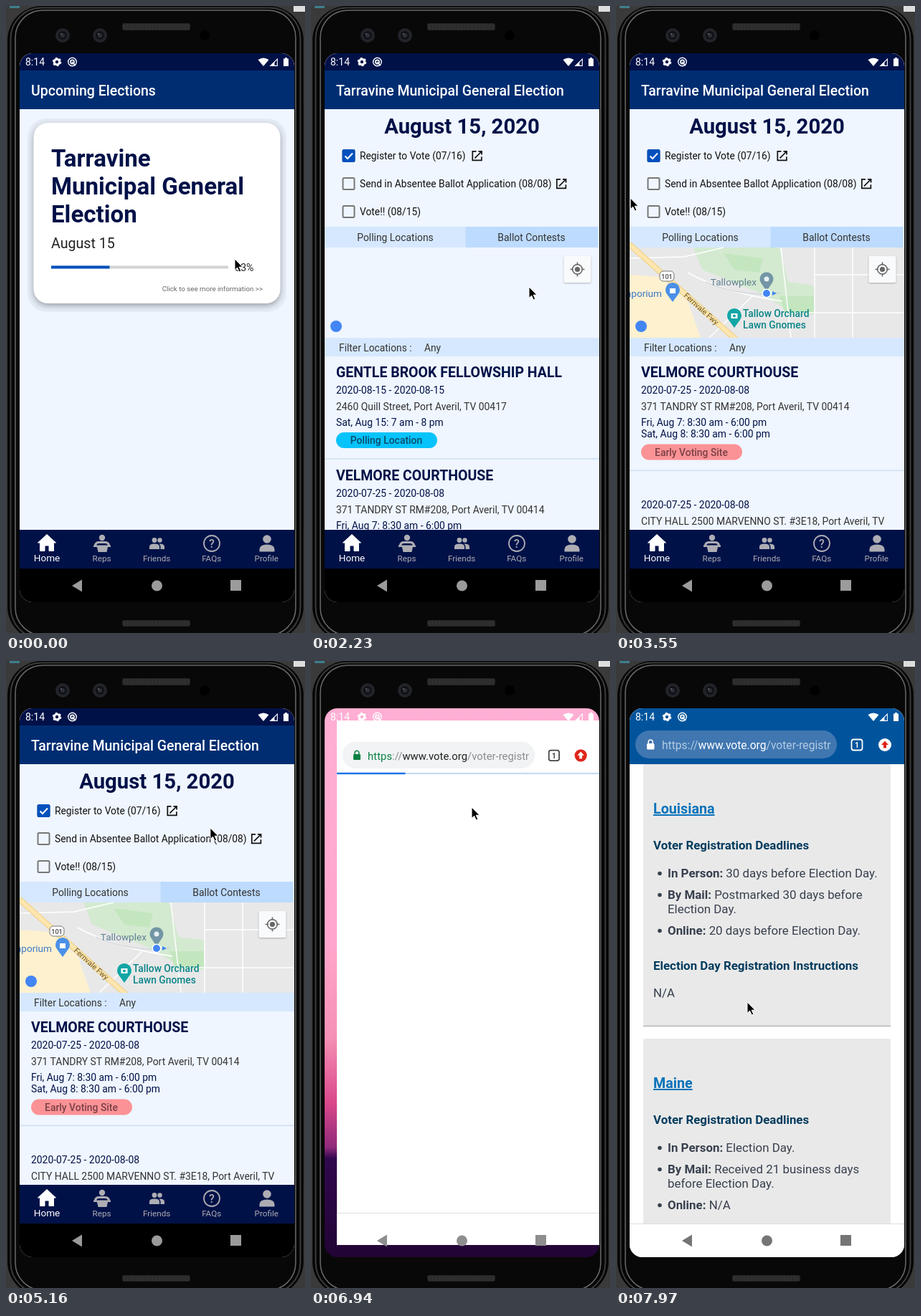
Animation of 417x875 px, one loop 8000 ms. Source, as an HTML page:

```html
<!DOCTYPE html>
<html lang="en">
<head>
<meta charset="utf-8">
<title>Election app walkthrough</title>
<style>
  html, body { margin: 0; width: 100%; height: 100%; overflow: hidden; background: #333; }
  svg { display: block; width: 100vw; height: 100vh; font-family: Roboto, sans-serif; }
  text { white-space: pre; }
  .shadow { filter: drop-shadow(0 3px 4px #0005); }
</style>
</head>
<body>
<svg id="stage" viewBox="0 0 417 875"></svg>
<script>
const NAVY = '#001148', BLUE = '#0050bd';
const svg = document.getElementById('stage');

const text = (x, y, size, str, fill = '#222', more = '') =>
  `<text x="${x}" y="${y}" font-size="${size}" fill="${fill}" ${more}>${str}</text>`;
const rect = (x, y, w, h, fill, more = '') =>
  `<rect x="${x}" y="${y}" width="${w}" height="${h}" fill="${fill}" ${more}/>`;
const circle = (x, y, r, fill, more = '') =>
  `<circle cx="${x}" cy="${y}" r="${r}" fill="${fill}" ${more}/>`;
const path = (d, fill, more = '') => `<path d="${d}" fill="${fill}" ${more}/>`;
const line = (d, stroke, width = 1, more = '') =>
  path(d, 'none', `stroke="${stroke}" stroke-width="${width}" ${more}`);
const group = (id, body, more = '') => `<g id="${id}" ${more}>${body}</g>`;
const MID = 'text-anchor="middle"', END = 'text-anchor="end"';
const BOLD = 'font-weight="700"', MEDIUM = 'font-weight="500"';

function phone() {
  const speaker = (y, h) => rect(162, y, 95, h, '#252525', 'rx="3"') +
    line(`M164 ${y + h / 2}H255`, '#3a3a3a', h - 2, 'stroke-dasharray="1 1.5"');
  const lens = x => circle(x, 41, 10, '#22242a') + circle(x, 41, 6, '#101216') +
    circle(x, 41, 3, '#2b3038') + circle(x - 2, 39, 1, '#667');
  return rect(0, 0, 417, 875, '#3a3a3a') + rect(5, 0, 14, 3, '#3f7f8c') + rect(401, 0, 16, 8, '#ddd') +
    rect(2, 0, 413, 886, '#050505', 'rx="48"') +
    rect(6.5, 2.5, 404, 880, '#050505', 'rx="43" stroke="#3c3c3c" stroke-width="2"') +
    rect(13, 6, 391, 872, '#080808', 'rx="38" stroke="#6a6a6a" stroke-width="1.5"') +
    speaker(24, 10) + speaker(857, 9) + lens(79) + lens(131) + circle(277, 41, 7, '#000');
}

function statusIcons() {
  const w = '#fff';
  return text(27, 83, 14, '8:14', w) +
    circle(71, 78, 3.7, 'none', `stroke="${w}" stroke-width="3"`) +
    circle(71, 78, 5.4, 'none', `stroke="${w}" stroke-width="1.8" stroke-dasharray="2.8 2.85"`) +
    circle(92.5, 78, 5.8, 'none', `stroke="${w}" stroke-width="1.4"`) +
    circle(92.5, 78, 2.6, 'none', `stroke="${w}" stroke-width="1.6"`) +
    line('M92 78L97 83', w, 1.6) +
    path('M351.5 75Q359 70 366.5 75L359 84z', w) +
    line('M368.8 83.4H378.4V74z', w, 1.1) + path('M368 84L374.5 77.5V84z', w) +
    path('M387 73.5h2v-1.5h3v1.5h2V84h-7z', w);
}

const navIcons = () => path('M106 800.5V817.5L92 809z', '') + circle(210.5, 809, 7.5, '') + rect(313, 801, 15, 15, '');

function tabBar() {
  const grey = '#adadb3';
  const icons = path('M57 737.5L69.5 749H66.5V760.5H60V753H54V760.5H47.5V749H44.5z', '#fff', 'stroke="#fff" stroke-linejoin="round"') +
    circle(134, 742, 4.2, grey) +
    line('M124.5 753Q125 748.5 130 748.5H138Q143 748.5 143.5 753', grey, 3.2) +
    path('M122 752.5H146V755H142L140.5 762H128.5L127 755H122z', grey) +
    circle(207, 745.5, 3.4, grey) + path('M200 758V754.5Q200 750.5 207 750.5T214 754.5V758z', grey) +
    circle(214.5, 745.5, 3.2, grey) + path('M215.5 758V754.5Q215.5 752 213.5 750.6Q221 750.5 221 754.5V758z', grey) +
    circle(287, 750, 11, 'none', `stroke="${grey}" stroke-width="1.8"`) +
    text(287, 756, 16, '?', grey, MID + MEDIUM) +
    circle(364, 744, 5.8, grey) + path('M353.5 761.5V758Q354 751.5 364 751.5T374.5 758V761.5z', grey);
  const labels = ['Reps', 'Friends', 'FAQs', 'Profile']
    .map((s, i) => text(133.5 + i * 76.6, 775, 11.7, s, grey, MID)).join('');
  return rect(19, 731, 383, 54, NAVY) + icons + text(57, 775, 13.6, 'Home', '#fff', MID) + labels;
}

const header = title => rect(19, 90, 383, 54, '#002d72') + text(35, 125, 19.5, title, '#fff', MEDIUM);

function home() {
  const title = ['Tarravine', 'Municipal General', 'Election']
    .map((s, i) => text(63, 224 + i * 39, 33.1, s, NAVY, BOLD)).join('');
  return header('Upcoming Elections') + group('card',
    rect(30, 157, 361, 270, '#e6edf7', 'rx="26"') +
    rect(38.5, 163, 344, 252, '#fff', 'rx="20" class="shadow"') + title +
    text(63, 338, 19.6, 'August 15') +
    rect(63, 362.5, 247, 4, '#d3d3d3') + rect(63, 362.5, 81.5, 4, BLUE) +
    text(345.5, 370, 14.2, '33%', '#222', END) +
    text(358, 398, 9.75, 'Click to see more information &gt;&gt;', '#666', END));
}

function task(y, label, linkX) {
  const link = linkX ? line(`M${linkX - 1} ${y - 6.2}h-5.2v12.6h12.6v-5.2M${linkX + 2} ${y - 6.2}h4.6v4.6M${linkX + 6.4} ${y - 6}l-9.4 9.4`, '#111', 1.7) : '';
  return rect(44.5, y - 8, 16, 16, 'none', 'rx="1.5" stroke="#777" stroke-width="2"') +
    text(68, y + 5, 13.8, label, '#111') + link;
}

// One location entry; the tag follows the last opening time.
function place(y, [name, dates, address, hours, tag, tagFill, tagInk]) {
  const tagY = y + 77 + (hours.length - 1) * 16.5;
  return text(35, y, 19.5, name, NAVY, BOLD) + text(35, y + 23, 13.9, dates, NAVY) +
    text(35, y + 46, 13.9, address, '#333') +
    hours.map((h, i) => text(35, y + 68 + i * 16, 13.9, h, NAVY)).join('') +
    rect(35, tagY, 141, 22, tagFill, 'rx="11"') + text(105, tagY + 16, 13.9, tag, tagInk, MID + MEDIUM) +
    rect(19, tagY + 36, 383, 1.6, '#cfe0f3');
}

function map() {
  const road = (d, w = 2) => line(d, '#fff', w);
  return rect(19, 337, 383, 126, '#e8e8e8') +
    path('M108 337H228L240 385 276 390V420H232L200 400 120 368z', '#d3ead0') +
    path('M150 345L205 352 200 372 165 368zM228 405H276V430H236z', '#c3e6bf') +
    path('M19 375L62 378 100 412 118 463H19z', '#fdf1cf') +
    road('M19 352L95 350 150 337M100 372Q150 400 232 412M277 337V463M230 337L244 463M330 337V463M277 375H402M232 428H402M130 463L190 405', 1.5) +
    line('M125 385Q180 408 230 400', '#c9d1d8', 1.2) +
    line('M18 332L168 466', '#f0cd80', 8) + line('M18 332L168 466', '#fce6ae', 6) +
    rect(61, 370, 20, 14, '#fff', 'rx="5" stroke="#777"') + text(71, 380.5, 9, '101', '#444', MID + MEDIUM) +
    text(64, 406, 13.6, 'nd mporium', '#3c78c8', END) +
    path('M79 413L71 402A10 10 0 1 1 87 402z', '#4a90e8') + rect(75, 394, 8, 7, '#fff') +
    text(0, 0, 10.5, 'Fernvale Fwy', '#6b5320', 'transform="translate(94 405) rotate(42)"') +
    text(196, 390, 13.6, 'Tallowplex', '#5f7f90', END) +
    path('M210 398L202 386A9.5 9.5 0 1 1 218 386z', '#7395a5') + circle(210, 381, 3.5, '#e7f0f3') +
    circle(210, 401, 6.5, '#fff') + circle(210, 401, 5, '#4285f4') + path('M218 398L224 401 218 404z', '#4285f4') +
    path('M165 449L157 438A10 10 0 1 1 173 438z', '#12a5a5') + rect(160.5, 429, 9, 7, '#fff') + circle(165, 432.5, 2, '#12a5a5') +
    text(177, 434, 13.8, 'Tallow Orchard', '#0b8588', MEDIUM) + text(177, 449.5, 13.8, 'Lawn Gnomes', '#0b8588', MEDIUM);
}

function detail() {
  const chapel = ['GENTLE BROOK FELLOWSHIP HALL', '2020-08-15 - 2020-08-15', '2460 Quill Street, Port Averil, TV 00417',
    ['Sat, Aug 15: 7 am - 8 pm'], 'Polling Location', '#06c3fb', '#0b4a68'];
  const court = ['VELMORE COURTHOUSE', '2020-07-25 - 2020-08-08', '371 TANDRY ST RM#208, Port Averil, TV 00414',
    ['Fri, Aug 7: 8:30 am - 6:00 pm', 'Sat, Aug 8: 8:30 am - 6:00 pm'], 'Early Voting Site', '#fb9296', '#7a4145'];
  const hall = ['', court[1], 'CITY HALL 2500 MARVENNO ST. #3E18, Port Averil, TV', ...court.slice(3)];
  return rect(19, 144, 383, 587, '#eff6ff') + header('Tarravine Municipal General Election') +
    text(210.5, 178, 29.3, 'August 15, 2020', NAVY, BOLD + MID) +
    task(209, 'Register to Vote (07/16)', 231.5) +
    rect(44.5, 201, 16, 16, 'none', `id="box" rx="1.5" stroke="${BLUE}" stroke-width="2"`) +
    group('tick', line('M47.5 209.5L51 213 58 205.5', '#fff', 2)) +
    task(248, 'Send in Absentee Ballot Application (08/08)', 349) + task(287, 'Vote!! (08/15)') +
    rect(19, 308, 197, 29, '#d6e8ff') + rect(215.5, 308, 185, 29, '#bddbff') +
    text(117.5, 328, 13.9, 'Polling Locations', '#333', MID) + text(307.5, 328, 13.9, 'Ballot Contests', '#333', MID) +
    group('locations', group('map', map()) + circle(35, 447, 8, '#4285f4') +
      rect(352.5, 349, 38, 37, '#f9fafc', 'rx="2" style="filter:drop-shadow(0 1px 1px #0004)"') +
      circle(371.5, 367.5, 6.8, 'none', 'stroke="#666" stroke-width="1.6"') + circle(371.5, 367.5, 3.6, '#666') +
      line('M371.5 357.5v4M371.5 373.5v4M361.5 367.5h4M377.5 367.5h4', '#666', 1.6) +
      rect(19, 463, 383, 26, '#d6e8ff') + text(39, 482, 13.8, 'Filter Locations :', '#333') + text(158, 482, 13.8, 'Any', '#333') +
      group('listA', place(518, chapel) + place(662, court)) +
      group('listB', place(518, court) + place(678, hall)));
}

const app = () => rect(19, 66, 383, 766, '#eff6ff') + rect(19, 66, 383, 24, NAVY) +
  group('home', home()) + group('detail', detail()) + tabBar() + rect(19, 785, 383, 47, '#000');

function toolbar(bar, pill, host, dim, scheme, lock, badge, arrow, ink) {
  return rect(19, 66, 383, 78, bar) + rect(27, 97, 281, 39, pill, 'rx="19.5"') +
    rect(43, 115, 10.5, 8.5, lock, 'rx="1.5"') + line('M45.2 116V113a3 3 0 0 1 6 0V116', lock, 1.6) +
    `<text x="64" y="123" font-size="15.6" fill="${dim}"><tspan fill="${scheme}">https</tspan>://<tspan fill="${host}">www.vote.org</tspan>/voter-registr</text>` +
    rect(328.5, 109.5, 15, 15, 'none', `rx="3" stroke="${ink}" stroke-width="1.8"`) +
    text(336, 121, 10.5, '1', ink, MID + BOLD) + circle(375, 117, 9, badge) +
    path('M375 111.5L380 117H377V121.5H373V117H370z', arrow);
}

function stateCard(y, state, bullets, tail) {
  const ink = '#38404e', dark = '#043c5e';
  const list = bullets.map(([dy, label, first, second]) => circle(61, y + dy - 5.5, 2.8, ink) +
    text(72, y + dy, 16.9, `<tspan ${BOLD}>${label}:</tspan> ${first}`, ink) +
    (second ? text(72, y + dy + 20, 16.9, second, ink) : '')).join('');
  return rect(38, y, 345, 366, '#e9e9e9', 'rx="2"') + rect(38, y + 364.5, 345, 2, '#c2c2c2') +
    text(52, y + 69, 19.7, state, '#0873ba', BOLD + ' text-decoration="underline"') +
    text(52, y + 119, 16.9, 'Voter Registration Deadlines', dark, BOLD) + list +
    text(52, y + 287, 16.9, 'Election Day Registration Instructions', dark, BOLD) +
    text(52, y + 325, 16.9, tail, ink);
}

const browser = () => rect(19, 66, 383, 766, '#fff') + group('page',
  stateCard(144, 'Louisiana', [[158, 'In Person', '30 days before Election Day.'],
    [188, 'By Mail', 'Postmarked 30 days before', 'Election Day.'], [238, 'Online', '20 days before Election Day.']], 'N/A') +
  stateCard(527, 'Maine', [[158, 'In Person', 'Election Day.'],
    [188, 'By Mail', 'Received 21 business days', 'before Election Day.'], [238, 'Online', 'N/A']], 'N/A')) +
  rect(19, 785, 383, 47, '#fff') + rect(19, 785, 383, 1, '#ddd') +
  group('barLight', toolbar('#fff', '#f1f3f4', '#222', '#8a8d91', '#0b8043', '#0b8043', '#e0251b', '#fff', '#444') +
    rect(19, 142, 383, 2.5, '#c9dcf7') + rect(19, 142, 100, 2.5, '#1a73e8')) +
  group('barBlue', toolbar('#01549c', '#4077b1', '#fff', '#b4cbe2', '#b4cbe2', '#fff', '#fff', '#e0251b', '#fff'));

const stops = [[0, '#ffafd4'], [.43, '#ffa6cc'], [.6, '#f58fb5'], [.72, '#d9488a'], [.8, '#8f2a7a'], [.82, '#30094d'], [1, '#230435']]
  .map(([o, c]) => `<stop offset="${o}" stop-color="${c}"/>`).join('');

svg.innerHTML = `<defs><clipPath id="screen">${rect(19, 66, 383, 766, '#000', 'rx="18"')}</clipPath>
  <linearGradient id="wallpaper" x2="0" y2="1">${stops}</linearGradient></defs>` + phone() +
  `<g clip-path="url(#screen)">` + rect(19, 66, 383, 766, 'url(#wallpaper)') +
  group('app', app()) + group('browser', browser()) + statusIcons() + group('nav', navIcons()) + '</g>' +
  group('cursor', path('M0 0V15.5L3.6 12.2 6.3 18 8.8 16.9 6.2 11.2H11z', '#000', 'stroke="#fff" stroke-width="1"'));

const el = Object.fromEntries([...svg.querySelectorAll('[id]')].map(n => [n.id, n]));
const set = (id, name, value) => el[id].setAttribute(name, value);
const fade = (id, amount) => set(id, 'opacity', +amount);

// Linear interpolation through [time, ...values] keys.
function track(t, keys) {
  const i = keys.findIndex(k => k[0] > t);
  if (i < 0) return keys.at(-1).slice(1);
  if (i === 0) return keys[0].slice(1);
  const a = keys[i - 1], b = keys[i], p = (t - a[0]) / (b[0] - a[0]);
  return a.slice(1).map((v, j) => v + (b[j + 1] - v) * p);
}

const pointer = [[100, 319, 353], [440, 276, 383], [740, 304, 388], [1190, 304, 392], [2370, 304, 392], [3400, 20, 268],
  [3550, 20, 268], [3950, 70, 300], [4580, 352, 246], [4720, 352, 246], [5750, 197, 216], [5900, 197, 216],
  [6050, 229, 209], [6640, 229, 209], [6940, 224, 204], [7240, 222, 206], [7680, 190, 440], [7940, 183, 476]];
const appZoom = [[6500, 1, 1], [6640, .997, 1], [6790, .95, .8], [6930, .92, 0]];
const browserSlide = [[6640, 383, .9], [6790, 170, .93], [6930, 18, .953], [7080, 0, 1]];

function draw(t) {
  fade('card', t < 1190 ? 1 : .4);
  fade('detail', track(t, [[1340, 0], [1770, 1]])[0]);
  const checked = t >= 2060;
  set('box', 'fill', checked ? BLUE : '#eff6ff');
  fade('tick', checked);
  fade('locations', t >= 2200);
  fade('map', t >= 2500);
  fade('listA', t < 2800);
  fade('listB', t >= 2800);

  const [zoom, alpha] = track(t, appZoom);
  set('app', 'transform', `translate(210.5 449) scale(${zoom}) translate(-210.5 -449)`);
  fade('app', alpha);

  const [dx, scale] = track(t, browserSlide), blue = t >= 7220;
  set('browser', 'transform', `translate(${19 + dx} ${66 + 383 * (1 - scale)}) scale(${scale}) translate(-19 -66)`);
  fade('browser', t > 6660);
  fade('barLight', !blue);
  fade('barBlue', blue);
  fade('page', blue);
  set('page', 'transform', `translate(0 ${track(t, [[7220, 383], [7510, 0]])[0]})`);
  set('nav', 'fill', t < 6660 ? '#9b9b9b' : blue ? '#757575' : '#8e8e8e');
  set('cursor', 'transform', `translate(${track(t, pointer).join(' ')})`);
}

// The screen refreshes in steps, like a low frame rate capture.
const STEP = 147.6, LOOP = 8000;
for (const n of el.nav.children) n.removeAttribute('fill');
function tick() {
  draw(Math.floor(performance.now() % LOOP / STEP + .1) * STEP);
  requestAnimationFrame(tick);
}
tick();
</script>
</body>
</html>
```
